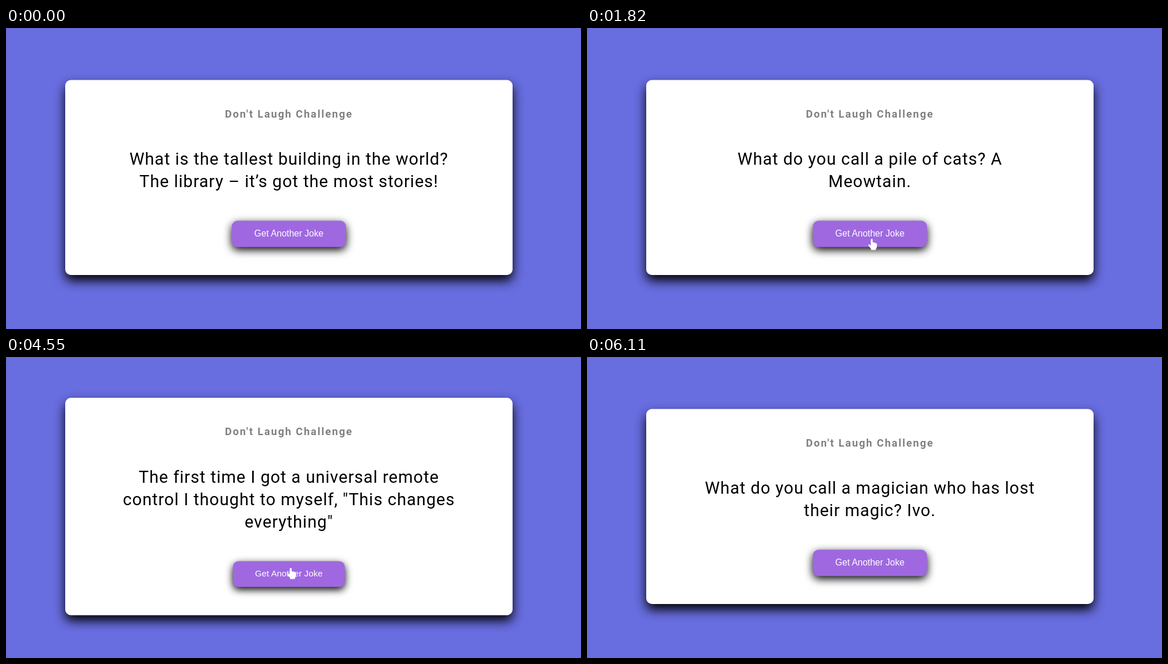
An HTML page for the animation above (6500 ms loop, 1000 px wide and 524 px high).

```html
<!DOCTYPE html>
<html lang="en">
<head>
<meta charset="utf-8">
<title>Don't Laugh Challenge</title>
<style>
  html, body { margin: 0; width: 100%; height: 100%; overflow: hidden; }
  body {
    position: relative;
    background: #686de0;
    box-shadow: inset 1px 1px #6267c8;
    font-family: Roboto, sans-serif;
  }
  .card {
    position: absolute;
    left: 492.3px;
    top: 259.9px;
    box-sizing: border-box;
    width: 800px;
    padding: 50px 20px;
    border-radius: 10px;
    background: #fff;
    box-shadow: 0 10px 20px #000;
    text-align: center;
    transform: scale(.9725) translate(-50%, -50%);
    transform-origin: 0 0;
  }
  h3 {
    margin: 0;
    font-size: 18.72px;
    line-height: 22px;
    letter-spacing: 2px;
    color: #808080;
  }
  .joke { margin: 50px 0; }
  .text {
    font-size: 30px;
    line-height: 40px;
    letter-spacing: 1px;
    white-space: pre;
  }
  .spinner { display: block; width: 90px; height: 90px; margin: 0 auto; overflow: visible; }
  .button {
    display: inline-block;
    vertical-align: top;
    padding: 14px 40px;
    border-radius: 10px;
    background: #9f68e0;
    box-shadow: 0 5px 15px #000;
    color: #fff;
    font: 16px/18.5px "Liberation Sans", Arial, sans-serif;
  }
  .cursor { position: absolute; left: 0; top: 0; width: 24px; height: 24px; overflow: visible; }
</style>
</head>
<body>
<div class="card">
  <h3>Don't Laugh Challenge</h3>
  <div class="joke">
    <div class="text" id="text"></div>
    <svg class="spinner" id="spinner" viewBox="-256 -256 512 512"><g id="dots"></g></svg>
  </div>
  <div class="button" id="button">Get Another Joke</div>
</div>
<svg class="cursor" id="cursor">
  <path id="hand" fill="#fff" d="M-.4 1.6Q-.2 0 1.2 0T2.8 1.6V6.2Q4.4 5.4 5.4 6.8Q7 6.2 7.8 7.6Q10 7.2 10.2 9.6V13Q10.2 16 8.4 17.4V19.4H0V17.6L-4.6 11.6Q-5.2 9.6-3.4 9.4L-.4 11.4Z"/>
  <path id="arrow" fill="#fff" stroke="#000" d="M.5 .5V16.5L4.2 13L6.8 18.8L9.2 17.8L6.7 12.2H12Z"/>
</svg>
<script>
const LOOP = 6500, STEP = 130;
const PRESSED = [11, 22, 35];

// Each scene starts at a step and shows either a joke or the spinner from an angle.
const scenes = [
  { from: 0, text: "What is the tallest building in the world?\nThe library – it’s got the most stories!" },
  { from: 12, angle: 18 },
  { from: 14, text: "What do you call a pile of cats? A\nMeowtain." },
  { from: 23, angle: 17 },
  { from: 24, text: "The first time I got a universal remote\ncontrol I thought to myself, \"This changes\neverything\"" },
  { from: 36, angle: 15 },
  { from: 37, text: "What do you call a magician who has lost\ntheir magic? Ivo." }
];

const el = id => document.getElementById(id);
const show = (node, visible, display = "block") => node.style.display = visible ? display : "none";

// Seven of eight evenly spaced dots; the upper right one is missing.
for (let i = 0; i < 7; i++) {
  const angle = i * Math.PI / 4;
  const dot = document.createElementNS("http://www.w3.org/2000/svg", "circle");
  dot.setAttribute("cx", 208 * Math.cos(angle));
  dot.setAttribute("cy", 208 * Math.sin(angle));
  dot.setAttribute("r", 48);
  el("dots").append(dot);
}

function cursorPosition(step) {
  const before = Math.max(0, (7 - step) / 3);
  const after = Math.max(0, (step - 42) / 5);
  return {
    x: 494 + 46 * before ** 2 + 30 * after,
    y: 367 + 92 * before ** 2 + 160 * after ** 1.5
  };
}

function drawScene(step) {
  const scene = scenes.findLast(s => s.from <= step);
  const spinning = scene.text === undefined;
  show(el("text"), !spinning);
  show(el("spinner"), spinning);
  if (spinning) {
    const angle = scene.angle + (step - scene.from) * STEP * .18;
    el("dots").setAttribute("transform", `rotate(${angle})`);
  } else if (el("text").textContent !== scene.text) {
    el("text").textContent = scene.text;
  }
  el("button").style.transform = PRESSED.includes(step) ? "scale(.98)" : "none";
}

function drawCursor(step) {
  const { x, y } = cursorPosition(step);
  const overButton = y < 382;
  show(el("cursor"), step >= 4 && step < 47);
  show(el("hand"), overButton, "inline");
  show(el("arrow"), !overButton, "inline");
  el("cursor").style.transform = `translate(${x}px, ${y}px)`;
}

const start = performance.now();
function frame() {
  const step = Math.floor((performance.now() - start) % LOOP / STEP);
  drawScene(step);
  drawCursor(step);
  requestAnimationFrame(frame);
}
frame();
</script>
</body>
</html>
```
